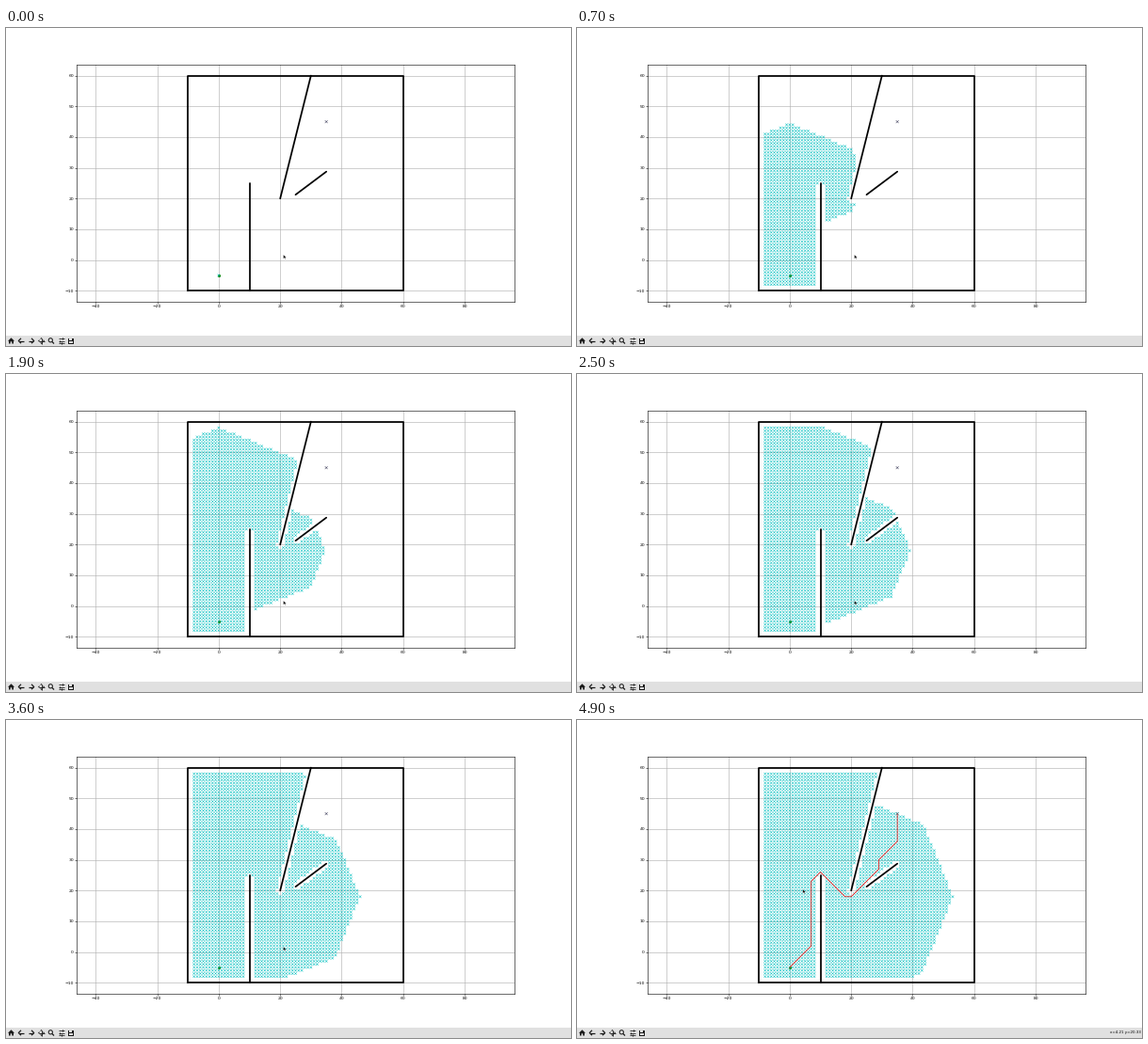
Animation, 600 px wide and 338 px high, one loop 5.3 s. Source, as a matplotlib script:

```python
import math
import numpy as np
import matplotlib.pyplot as plt
from matplotlib.animation import FuncAnimation
from matplotlib.patches import Circle, Polygon, Rectangle

W, H, DPI = 600, 338, 32
PX = 72 / DPI               # points per pixel
CANVAS_H = 326.6            # plot canvas above the toolbar
STEP_MS, FRAMES = 100, 53
END_MS = 4900

START, GOAL = (0, -5), (35, 45)
WALLS = [((10, -10), (10, 24.95)), ((20, 20), (30, 60)), ((25, 21.25), (35, 28.75))]
ROUTE = [(0, -5), (7, 2), (7, 23), (10, 26), (18, 18), (20, 18),
         (29, 27), (29, 30), (35, 36), (35, 45)]
MOVES = [(1, 0), (0, 1), (-1, 0), (0, -1), (-1, -1), (-1, 1), (1, -1), (1, 1)]


def wall_distance(p, a, b):
    p, a, b = (np.array(v, float) for v in (p, a, b))
    d = b - a
    u = np.clip(np.dot(p - a, d) / np.dot(d, d), 0, 1)
    return np.hypot(*(p - a - u * d))


def is_free(p):
    inside = -9 < p[0] < 59 and -9 < p[1] < 59
    return inside and all(wall_distance(p, a, b) > 1 + 1e-9 for a, b in WALLS)


def dijkstra():
    """Cells in the order they are expanded, with their costs."""
    free = {(x, y) for x in range(-9, 60) for y in range(-9, 60) if is_free((x, y))}
    frontier, closed = {START: 0.0}, {}
    while frontier:
        cell = min(frontier, key=frontier.get)
        cost = closed[cell] = frontier.pop(cell)
        if cell == GOAL:
            break
        for dx, dy in MOVES:
            near = (cell[0] + dx, cell[1] + dy)
            if near not in free or near in closed:
                continue
            new = cost + math.hypot(dx, dy)
            if new < frontier.get(near, math.inf):
                frontier[near] = new
    return np.array(list(closed)), np.array(list(closed.values()))


def crosses(points, half):
    """One broken line that draws an x at every point."""
    p = np.asarray(points, float)[:, None, :]
    shape = np.array([(-1, -1), (1, 1), (np.nan, np.nan),
                      (-1, 1), (1, -1), (np.nan, np.nan)]) * half
    return (p + shape).reshape(-1, 2)


cells, costs = dijkstra()

# Redrawing slows as marks pile up: the squared count grows evenly between these.
PACE = [(90, 0), (600, 47.5), (700, 49.6), (1200, 57.2), (1800, 62.25), (1900, 63.2),
        (2400, 67.1), (2500, 67.75), (3200, 71.85), (4100, 77.75), (END_MS, 99)]
pace_t = [t for t, _ in PACE]
pace_n2 = [float(np.searchsorted(costs, c, side="right")) ** 2 for _, c in PACE]


def expanded(ms):
    return max(1, int(math.sqrt(np.interp(ms, pace_t, pace_n2))))


fig = plt.figure(figsize=(W / DPI, H / DPI), dpi=DPI, facecolor="white")

# Plot
ax = fig.add_axes([0.125, 1 - 0.89 * CANVAS_H / H, 0.775, 0.77 * CANVAS_H / H])
ax.set_xlim(25 - 71.2, 25 + 71.2)
ax.set_ylim(-13.5, 63.5)
ax.set_xticks(range(-40, 81, 20))
ax.set_yticks(range(-10, 61, 10))
ax.grid(True, color="#b0b0b0", lw=1.35)
ax.tick_params(labelsize=10, length=3.5, width=1.2)
for spine in ax.spines.values():
    spine.set_linewidth(1.3)

thick = dict(color="black", lw=1.75 * PX, solid_capstyle="round",
             solid_joinstyle="round", zorder=3)
ax.plot([-10, 60, 60, -10, -10], [-10, -10, 60, 60, -10], **thick)
for a, b in WALLS:
    ax.plot(*zip(a, b), **thick)

ax.scatter(*START, s=49, color="#008000", lw=0, zorder=4)
ax.plot(*crosses([GOAL], 0.41).T, color="#303050", lw=1, zorder=4)
marks = crosses(cells, 0.41)
searched, = ax.plot([], [], color="#00bfbf", lw=1, solid_capstyle="butt",
                    snap=False, zorder=5)
route, = ax.plot(*zip(*ROUTE), color="red", lw=1.6, zorder=6)

# Window parts, in pixels
ui = fig.add_axes([0, 0, 1, 1], facecolor="none")
ui.set_xlim(0, W)
ui.set_ylim(H, 0)
ui.axis("off")
INK = "#1a1a1a"
BAR_Y = 332.5


def box(x, y, w, h, color):
    ui.add_patch(Rectangle((x, y), w, h, fc=color, lw=0))


def shape(points, color=INK, **kw):
    patch = Polygon(points, closed=True, fc=color, **{"lw": 0, **kw})
    return ui.add_patch(patch)


def stroke(xs, ys, width=1.0):
    ui.plot(xs, ys, color=INK, lw=width * PX, solid_capstyle="butt")


def arrow_icon(x, way):
    tip = x + 3 * way
    stroke([x - 3 * way, tip - way], [BAR_Y, BAR_Y], 1.2)
    stroke([x, tip - 0.3 * way, x], [BAR_Y - 2.7, BAR_Y, BAR_Y + 2.7], 1.2)


def toolbar():
    box(0, 327, W, 11, "#e0e0e0")
    y = BAR_Y
    shape([(2, y + .2), (5.5, y - 3.2), (9, y + .2), (8, y + .2), (8, y + 3),
           (6.3, y + 3), (6.3, y + .8), (4.7, y + .8), (4.7, y + 3), (3, y + 3), (3, y + .2)])
    arrow_icon(16, -1)
    arrow_icon(27, 1)
    x = 37.5
    stroke([x - 3, x + 3], [y, y], 0.9)
    stroke([x, x], [y - 3, y + 3], 0.9)
    for dx, dy in MOVES[:4]:
        shape([(x + 3.5 * dx, y + 3.5 * dy),
               (x + 2 * dx + 1.4 * dy, y + 2 * dy + 1.4 * dx),
               (x + 2 * dx - 1.4 * dy, y + 2 * dy - 1.4 * dx)])
    ui.add_patch(Circle((47.3, y - .7), 2.1, fill=False, ec=INK, lw=1 * PX))
    stroke([48.9, 51], [y + .9, y + 3], 1.3)
    for dy, knob in ((-2.2, 60), (0, 57), (2.2, 59.2)):
        stroke([55.5, 61.5], [y + dy] * 2, 0.8)
        stroke([knob] * 2, [y + dy - 1, y + dy + 1], 1)
    box(66, y - 3, 6, 6, INK)
    box(67.2, y - 2.3, 3, 1.5, "#e0e0e0")
    box(67, y + .4, 4, 2, "#e0e0e0")


toolbar()
POINTER = np.array([(0, 0), (0, 4.2), (1, 3.3), (1.7, 4.9), (2.4, 4.6), (1.7, 3.1), (3, 3)])
pointer = shape(POINTER, "black", ec="white", lw=0.25 * PX, zorder=9)
readout = ui.text(598.5, BAR_Y, "x=4.21 y=20.33", fontsize=9, ha="right",
                  va="center", color="black")


def draw(i):
    ms = i * STEP_MS
    done = ms >= END_MS
    searched.set_data(*marks[:6 * expanded(ms)].T)
    route.set_visible(done)
    readout.set_visible(done)
    pointer.set_xy(POINTER + ((239.8, 180) if done else (294.6, 241)))
    return searched, route, readout, pointer


anim = FuncAnimation(fig, draw, frames=FRAMES, interval=STEP_MS, repeat=True,
                     repeat_delay=0, blit=False)
plt.show()
```
